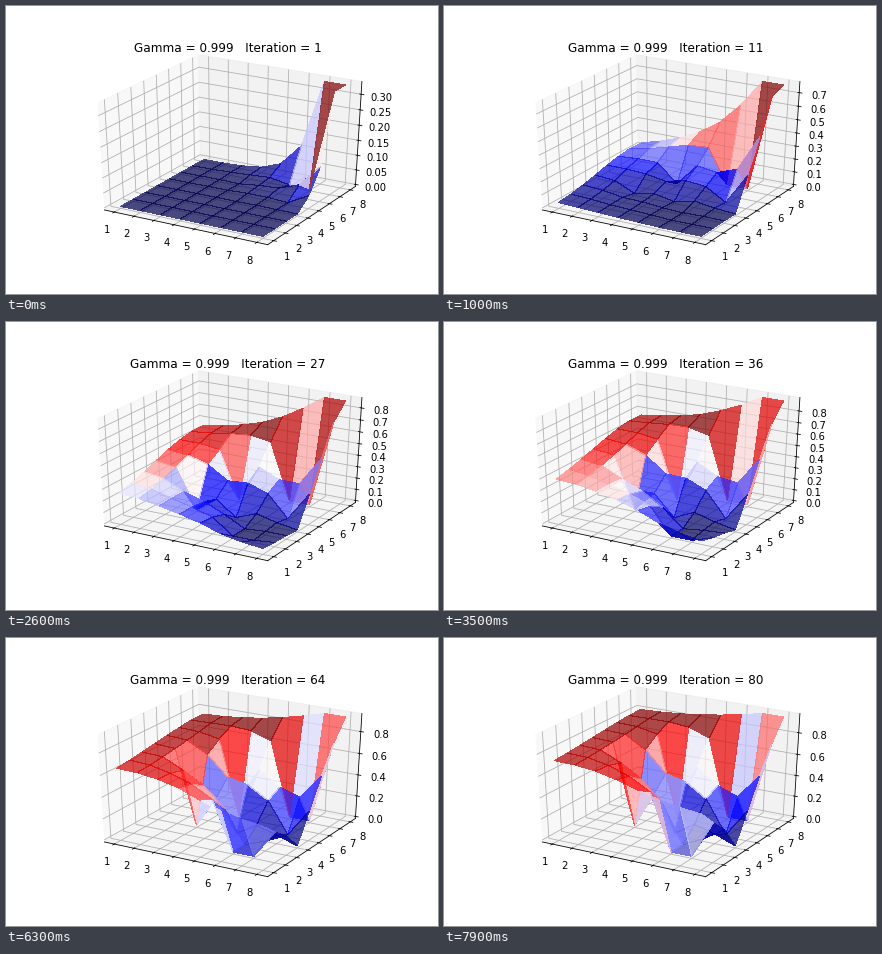
These frames come from a looping animation (432 px wide and 288 px high, 8 s). A matplotlib script:

```python
import matplotlib.pyplot as plt
import numpy as np
from matplotlib.animation import FuncAnimation
from matplotlib.ticker import MaxNLocator
from mpl_toolkits.mplot3d.art3d import Poly3DCollection

GAMMA = 0.999
N = 8
STEPS = 80
HOLES = {(2, 3), (3, 5), (4, 3), (5, 1), (5, 2), (5, 6),
         (6, 1), (6, 4), (6, 6), (7, 3)}
GOAL = (7, 7)
MOVES = [(0, -1), (1, 0), (0, 1), (-1, 0)]


def clip(i):
    return min(max(i, 0), N - 1)


def sweep(v):
    """One in-place value update on the slippery grid, last cell first."""
    for r in reversed(range(N)):
        for c in reversed(range(N)):
            if (r, c) in HOLES or (r, c) == GOAL:
                continue
            q = []
            for dr, dc in MOVES:
                cell = clip(r + dr), clip(c + dc)
                q.append(1.0 if cell == GOAL else GAMMA * v[cell])
            v[r, c] = max(q[a - 1] + q[a] + q[(a + 1) % 4] for a in range(4)) / 3


def history():
    v = np.zeros((N, N))
    out = []
    for _ in range(STEPS):
        sweep(v)
        shown = v.copy()
        shown[GOAL] = v.max()
        out.append(shown)
    return out


def quads(z):
    """Closed outline of every grid cell."""
    ring = [(0, 0), (0, 1), (1, 1), (1, 0), (0, 0)]
    return np.array([[(r + i + 1, c + j + 1, z[r + i, c + j]) for i, j in ring]
                     for r in range(N - 1) for c in range(N - 1)])


def padded(lo, hi):
    pad = (hi - lo) / 48
    return lo - pad, hi + pad


values = history()
fig = plt.figure(figsize=(6, 4), dpi=72, facecolor="white")
ax = fig.add_axes([0.125, 0.125, 0.775, 0.755], projection="3d")
ax.apply_aspect = lambda position=None: None  # fill the wide axes
ax.set_box_aspect((1, 1, 1), zoom=np.sqrt(3) / 1.8294640721620434)
ax.view_init(elev=30, azim=-60)
ax.set_xticks(range(1, N + 1))
ax.set_yticks(range(1, N + 1))
ax.set_xlim(*padded(0.65, 8.35))
ax.set_ylim(*padded(0.65, 8.35))
locator = MaxNLocator(nbins=9, steps=[1, 2, 2.5, 5, 10])
surface = []


def draw(i):
    z = values[i]
    top = z.max()
    while surface:
        surface.pop().remove()
    polys = quads(z)
    mean = polys[:, :, 2].mean(axis=1)
    shade = (mean - mean.min()) / np.ptp(mean)
    surface.append(Poly3DCollection(
        polys, facecolors=plt.cm.seismic(shade, alpha=0.7),
        edgecolors="none", linewidths=0, antialiased=False))
    ax.add_collection3d(surface[0])
    ax.set_zticks([t for t in locator.tick_values(0, top) if 0 <= t <= top])
    ax.set_zlim(*padded(0, top))
    ax.set_title(f"Gamma = {GAMMA}   Iteration = {i + 1}", y=1)
    return surface


anim = FuncAnimation(fig, draw, frames=STEPS, interval=100,
                     init_func=lambda: [], repeat=True, repeat_delay=0)
plt.show()
```
